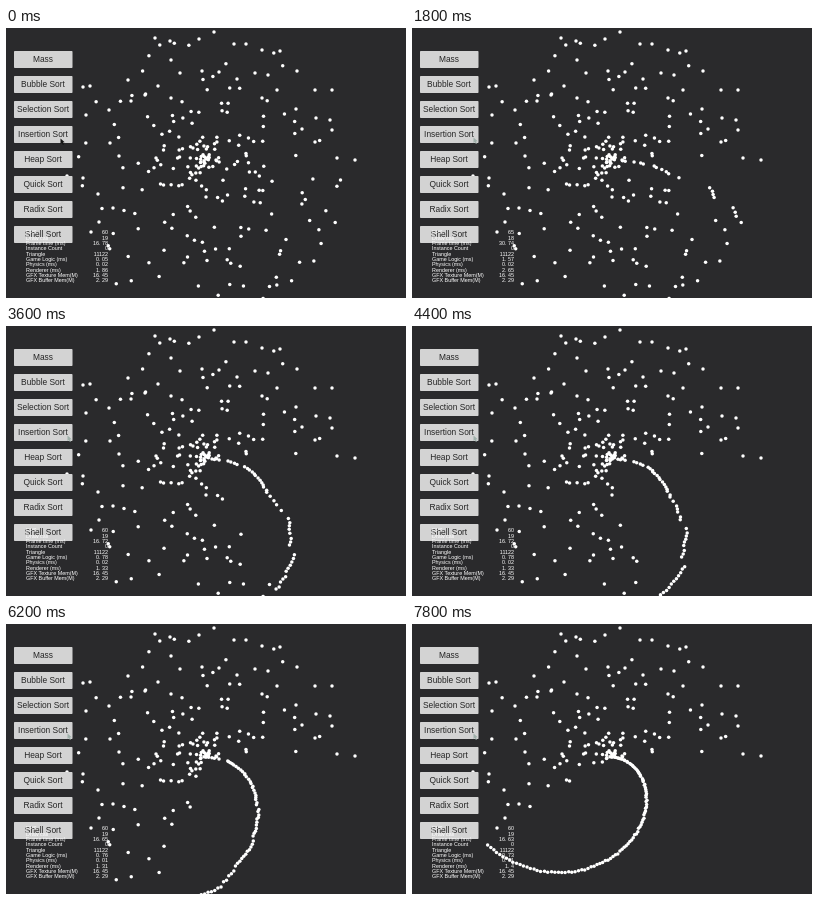
These frames come from a looping animation (400x270 px, 8 s). An HTML page with a canvas:

```html
<!DOCTYPE html>
<html lang="en">
<head>
<meta charset="utf-8">
<title>Insertion sort spiral</title>
<style>
  html, body { margin: 0; width: 100%; height: 100%; overflow: hidden; background: #2a2a2c; }
  canvas, svg { position: absolute; left: 0; top: 0; width: 400px; height: 270px; }
  text { font-family: "Liberation Sans", Arial, sans-serif; }
  .button { fill: #d3d3d3; }
  .caption { font-size: 8.4px; fill: #252525; text-anchor: middle; }
  .stat { font-size: 5.4px; fill: #fff; }
  .value { text-anchor: end; }
</style>
</head>
<body>
<canvas id="dots" width="400" height="270"></canvas>
<svg id="panel" viewBox="0 0 400 270">
  <g id="buttons"></g>
  <g id="stats"></g>
  <path id="cursor" d="M0 0V5.6L1.4 4.4 2.4 6.5 3.4 6 2.4 4 4.2 3.8Z"/>
</svg>
<script>
const LOOP = 8000, STEP = 200;
const CENTER = { x: 198, y: 133 };
const SWEEP = 2.53;        // angle reached by the sort at the end of the loop
const SWEPT_DOTS = 101, INNER_DOTS = 75, OUTER_DOTS = 32;
const INNER_RADIUS = 72, OUTER_RADIUS = 130;

// The most prominent dots the sort never reaches: x, y pairs
const LANDMARKS = [
  149,10, 164,13, 165,32, 193,11, 208,4, 228,16, 240,16, 256,22, 274,23,
  262,47, 249,45, 291,43, 309,62, 326,62, 271,62, 256,70, 231,51, 213,44,
  196,43, 174,45, 122,52, 152,58, 139,67, 84,58, 77,59, 125,73, 103,82,
  80,87, 165,70, 290,81, 310,90, 324,92, 296,101, 326,102, 309,114, 331,130,
  349,132, 104,115, 113,128, 77,150, 61,148, 92,166, 107,180, 93,194, 85,204
];

// frame time, game logic, physics, renderer
const READINGS = [
  "16.78 0.05 0.02 1.86",
  "30.74 1.57 0.02 2.65",
  "16.65 0.85 0.02 1.6",
  "16.72 0.78 0.02 1.33",
  "16.57 0.71 0.01 1.29",
  "16.65 0.76 0.01 1.31",
  "16.63 0.73 0.01 1.4"
];

const LABELS = ["FPS", "Draw call", "Frame time (ms)", "Instance Count", "Triangle",
  "Game Logic (ms)", "Physics (ms)", "Renderer (ms)", "GFX Texture Mem(M)", "GFX Buffer Mem(M)"];

function seeded(seed) {
  return () => {
    seed = (seed * 16807) % 2147483647;
    return seed / 2147483647;
  };
}

const random = seeded(271828);
const polar = (angle, r) => [CENTER.x + r * Math.cos(angle), CENTER.y + r * Math.sin(angle)];

const still = [];
for (let i = 0; i < LANDMARKS.length; i += 2) still.push([LANDMARKS[i], LANDMARKS[i + 1]]);

function scatter(count, near, far) {
  for (let i = 0; i < count; i++) {
    const angle = SWEEP + (i + 0.5) / count * (2 * Math.PI - SWEEP);
    still.push(polar(angle, near + (far - near) * random()));
  }
}
scatter(INNER_DOTS, 0, INNER_RADIUS);
scatter(OUTER_DOTS, INNER_RADIUS, OUTER_RADIUS);

// Evenly spread radii in shuffled order
const radii = Array.from({ length: SWEPT_DOTS }, (_, i) => {
  const u = (i + random()) / SWEPT_DOTS;
  return 165 * u - 14 * u ** 6;
});
for (let i = SWEPT_DOTS - 1; i > 0; i--) {
  const j = Math.floor(random() * (i + 1));
  [radii[i], radii[j]] = [radii[j], radii[i]];
}

// The sort runs fast at first, then settles to a steady pace
function sortedAngle(t) {
  const s = Math.max(0, (t - 1000) / 6800);
  return s * (4.16 - 4.66 * s + 3.03 * s * s);
}

function add(parent, tag, attributes, text = "") {
  const node = document.createElementNS("http://www.w3.org/2000/svg", tag);
  for (const key in attributes) node.setAttribute(key, attributes[key]);
  node.textContent = text;
  document.getElementById(parent).append(node);
  return node;
}

["Mass", "Bubble Sort", "Selection Sort", "Insertion Sort", "Heap Sort",
  "Quick Sort", "Radix Sort", "Shell Sort"].forEach((name, i) => {
  const y = 31.5 + 25 * i;
  add("buttons", "rect", { class: "button", x: 8, y: y - 8.5, width: 58.5, height: 17, rx: 0.8 });
  add("buttons", "text", { class: "caption", x: 37, y: y + 2.9 }, name);
});

const values = LABELS.map((label, i) => {
  const y = 206.2 + 5.35 * i;
  add("stats", "text", { class: "stat", x: 20, y }, label);
  return add("stats", "text", { class: "stat value", x: 102, y });
});

const cursor = document.getElementById("cursor");
const ctx = document.getElementById("dots").getContext("2d");
ctx.fillStyle = "#fff";

function dot([x, y]) {
  ctx.beginPath();
  ctx.arc(x, y, 1.75, 0, 2 * Math.PI);
  ctx.fill();
}

function draw(t) {
  ctx.clearRect(0, 0, 400, 270);
  still.forEach(dot);
  const count = Math.min(SWEPT_DOTS, Math.round(sortedAngle(t) / SWEEP * SWEPT_DOTS));
  const order = radii.slice(0, count).sort((a, b) => a - b).concat(radii.slice(count));
  order.forEach((r, i) => dot(polar((i + 0.5) / SWEPT_DOTS * SWEEP, r)));

  const reading = Math.min(READINGS.length - 1, Math.floor((t + 200) / 1200));
  const [frame, logic, physics, render] = READINGS[reading].replaceAll(".", ".\u00a0").split(" ");
  [reading === 1 ? "65" : "60", reading === 1 ? "18" : "19", frame, "0", "11122",
    logic, physics, render, "16. 45", "2. 29"]
    .forEach((value, i) => { values[i].textContent = value; });

  const move = Math.min(1, Math.max(0, (t - 200) / 400));
  cursor.setAttribute("transform", `translate(${54.5 + 7 * move} ${110.5 - move})`);
  cursor.setAttribute("fill", move < 1 ? "#161616" : "#9fb0aa");
}

let shown = -1;
const start = performance.now();
function tick() {
  const t = Math.floor((performance.now() - start) % LOOP / STEP) * STEP;
  if (t !== shown) draw(shown = t);
  requestAnimationFrame(tick);
}
tick();
</script>
</body>
</html>
```
